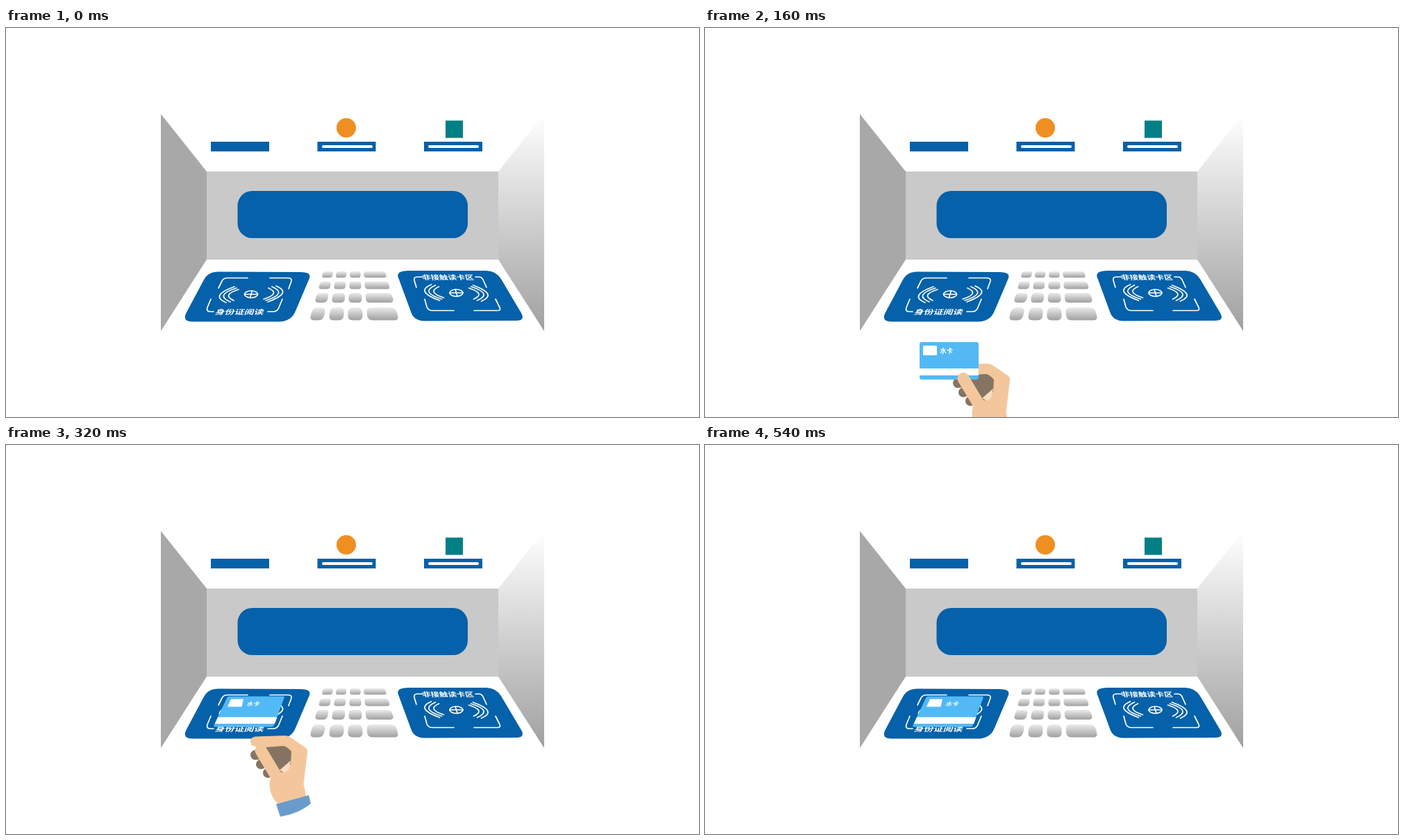
An HTML page for the animation above (2.94 s loop, 998 by 561 pixels).

```html
<!DOCTYPE html>
<html lang="zh">
<head>
<meta charset="utf-8">
<title>水卡</title>
<style>
  html, body { margin: 0; width: 100%; height: 100%; overflow: hidden; background: #fff; }
  svg { display: block; width: 998px; height: 561px; }
  text { font-family: "Noto Sans CJK SC", "Noto Sans CJK", sans-serif; font-weight: 700; fill: #fff; }
  .blue { fill: #0561a9; }
  .line { fill: none; stroke: #fff; stroke-width: 1.7; stroke-linecap: round; stroke-linejoin: round; }
  .skin { fill: #f3c79b; }
  .shade { fill: #867463; }
  .knuckles { fill: none; stroke: #867463; stroke-width: 14; stroke-linecap: round; }
  .thumb { stroke: #f3c79b; stroke-width: 17; stroke-linecap: round; }
  .hand, .held, .laid { animation: 2940ms step-end infinite; }
  .hand { animation-name: reach; }
  .held { animation-name: release; }
  .laid { animation-name: lay; }

  /* slide in, let go of the card, withdraw */
  @keyframes reach {
    0% { transform: translate(0, 250px); }
    1.02% { transform: translate(0, 190px); }
    4.42% { transform: translate(0, 145px); }
    5.44% { transform: translate(0, 90px); }
    6.46% { transform: translate(0, 34px); }
    7.48% { transform: translate(0, 0); }
    10.88% { transform: translate(-5px, 25px); }
    11.9% { transform: translate(-1.5px, 52.5px); }
    12.92% { transform: translate(2px, 80px); }
    16.32% { transform: translate(5.5px, 107.5px); }
    17.34% { transform: translate(9px, 135px); }
    18.36%, 100% { transform: translate(0, 250px); }
  }
  @keyframes release {
    0% { visibility: visible; }
    10.88%, 100% { visibility: hidden; }
  }
  @keyframes lay {
    0% { visibility: hidden; }
    10.88%, 100% { visibility: visible; }
  }
</style>
</head>
<body>
<svg viewBox="0 0 998 561" xmlns="http://www.w3.org/2000/svg">
  <defs>
    <linearGradient id="side" x1="0" y1="0" x2="0" y2="1">
      <stop offset="0" stop-color="#fff"/>
      <stop offset="1" stop-color="#a0a0a0"/>
    </linearGradient>
    <linearGradient id="metal" x1="0" y1="0" x2="0" y2="1">
      <stop offset="0" stop-color="#ececec"/>
      <stop offset="1" stop-color="#a0a0a0"/>
    </linearGradient>
    <g id="waves" class="line">
      <ellipse rx="9.5" ry="5"/>
      <path d="M-9.5,0H9.5M1.5,-5L-1.5,5"/>
      <path id="arcs" d="M-24,-11Q-60,2 -36,12M-21,-9Q-53,1 -30,11M-18,-7Q-43,1 -25,9"/>
      <use href="#arcs" transform="rotate(180)"/>
    </g>
  </defs>

  <!-- booth -->
  <path fill="#a8a8a8" d="M223,124L289,207V334L223,437Z"/>
  <path fill="url(#side)" d="M775,124L709,207V334L775,437Z"/>
  <rect x="289" y="207" width="420" height="127" fill="#c9c9c9"/>
  <rect class="blue" x="333.5" y="235" width="331.5" height="68" rx="21"/>

  <!-- slots -->
  <g class="blue">
    <rect x="295" y="164" width="84" height="14"/>
    <rect x="448.5" y="164" width="84" height="14"/>
    <rect x="602" y="164" width="84" height="14"/>
  </g>
  <rect x="455" y="169" width="73" height="4" rx="2" fill="#fff"/>
  <rect x="608" y="169" width="73" height="4" rx="2" fill="#fff"/>
  <circle cx="490" cy="144" r="14" fill="#ef8f22"/>
  <rect x="633" y="133.5" width="25" height="25" fill="#007f86"/>

  <!-- left reader -->
  <path class="blue" d="M306,351.5L424,352Q441,352 436.5,362L417,408Q411,423 394,423.5H268Q253,423 260,410L285,363Q291,351.5 306,351.5Z"/>
  <path class="line" d="M306,375L311,365Q313,360.500 319,360.500H348M380,360.500H406Q412,360.500 411,365L407,376M295,391L290,403Q288,409 294,409H299M398,391L393,403Q391,409 385,409H377"/>
  <use href="#waves" x="353" y="384"/>
  <text font-size="14" transform="translate(300.500,412.500) skewX(-18) scale(1,.68)">身份证阅读</text>

  <!-- right reader -->
  <path class="blue" d="M580,350H692Q706,350.500 713,362L742,411Q748,422 735,422L602,422.500Q587,422 583,409L565,360Q561,350 580,350Z"/>
  <path class="line" d="M591,374L588,364Q587,359 592,359H600M676,359H681Q685,359 687,363L692,374M603,391L606,402Q608,407.500 614,407.500H645M674,407.500H708Q713,407.500 711,403L705,391"/>
  <use href="#waves" transform="translate(648.500,382) scale(-1,1)"/>
  <text font-size="12.4" transform="translate(600,362.500) skewX(14) scale(1,.74)">非接触读卡区</text>

  <g id="keys" fill="url(#metal)"></g>

  <!-- card on the reader -->
  <g class="laid">
    <path fill="#52b9f5" d="M321,362.500H399Q401.500,362.500 400.500,365L386,404Q385,406.500 382.500,406.500H301Q298.500,406.500 299.500,404L318,365Q319,362.500 321,362.500Z"/>
    <path fill="#fff" d="M305,392.500H390.500L387,402H300.800Z"/>
    <path fill="#fff" d="M324,366.500H342L339.500,377.500H319Z"/>
    <text font-size="9.3" transform="translate(346,375.500) skewX(-20) scale(1,.8)">水卡</text>
  </g>

  <g class="hand">
    <path class="knuckles" d="M364,422L384,420M372,435.500L388,430M382,448L392,440"/>
    <path class="skin" d="M364,395.500L407,394Q411,394 415,397L436,411Q440,414 439,419L433.500,464L438,484L398,494Q384,481 384.500,463Q385,457 389,452L364,409.500Q357,409 357,402.500Q357.500,396 364,395.500Z"/>
    <path class="shade" d="M378,411L404,409Q409,409 416,417L415,435L403,447L398,446Z"/>
    <path fill="#fbdcc0" d="M415,430L413,441Q411,446 405,447L399,444Z"/>
    <path fill="#6a9ccb" d="M394,493L441,480L444,492Q428,506 400,511Z"/>
    <g class="held">
      <rect x="309" y="363" width="85" height="54" rx="3" fill="#52b9f5"/>
      <rect x="309" y="401" width="85" height="10" fill="#fff"/>
      <rect x="314" y="368" width="20" height="14" rx="1.5" fill="#fff"/>
      <text x="338.500" y="378.500" font-size="9.3">水卡</text>
    </g>
    <path class="thumb" d="M372,415.500L394,452"/>
  </g>
</svg>
<script>
  const keys = document.getElementById('keys');
  const rows = [[351, 360], [365.5, 376.5], [382, 396], [403, 421.5]];
  // left and right edge of each column, at the top and the bottom of the keypad
  const columns = [
    [[457, 437], [471.5, 457]],
    [[476, 464.5], [490.5, 486]],
    [[495.5, 492], [510.5, 514]],
    [[515, 520.5], [546, 566]]
  ];
  const edgeAt = ([top, bottom], y) => top + (bottom - top) * (y - 351) / 70;
  const toward = (a, b, d) => {
    const k = d / Math.hypot(b[0] - a[0], b[1] - a[1]);
    return [a[0] + (b[0] - a[0]) * k, a[1] + (b[1] - a[1]) * k];
  };

  function roundedPath(points, radius) {
    const n = points.length;
    return points.map((p, i) => {
      const start = toward(p, points[(i + n - 1) % n], radius);
      const end = toward(p, points[(i + 1) % n], radius);
      return `${i ? 'L' : 'M'}${start}Q${p} ${end}`;
    }).join('') + 'Z';
  }

  for (const [top, bottom] of rows) {
    for (const [left, right] of columns) {
      const corners = [
        [edgeAt(left, top), top], [edgeAt(right, top), top],
        [edgeAt(right, bottom), bottom], [edgeAt(left, bottom), bottom]
      ];
      const key = document.createElementNS('http://www.w3.org/2000/svg', 'path');
      key.setAttribute('d', roundedPath(corners, (bottom - top) * 0.4));
      keys.append(key);
    }
  }
</script>
</body>
</html>
```
